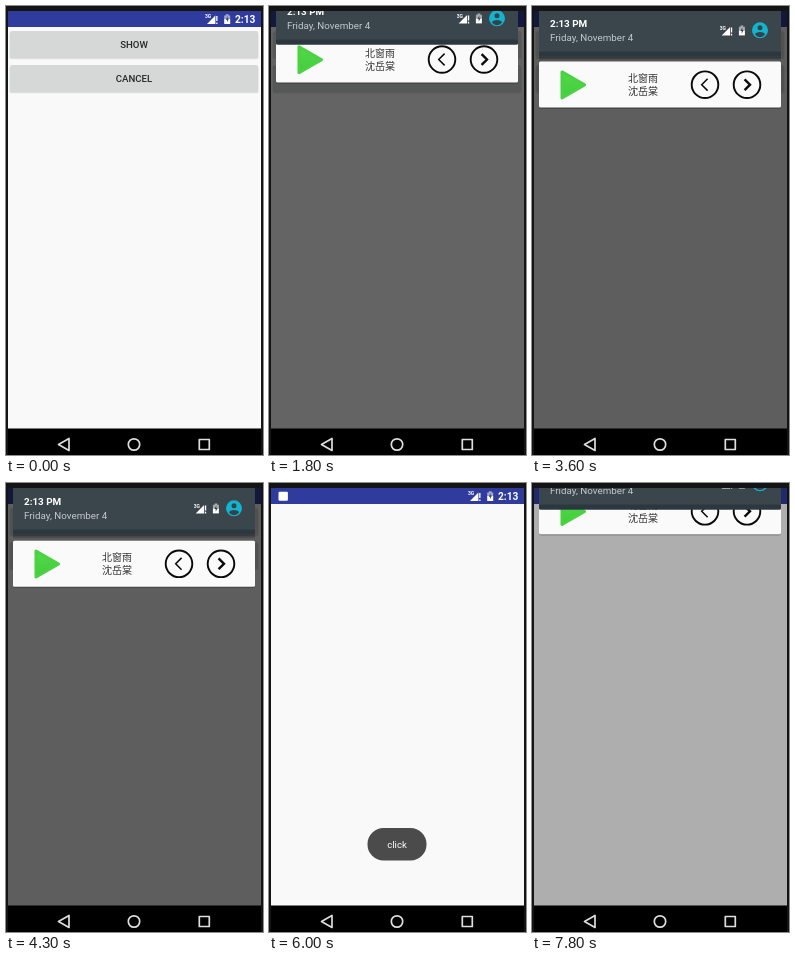
Recreate the animation shown at these times as an HTML page. Size 257 by 449 pixels, loop 8 s.

```html
<!DOCTYPE html>
<html lang="en">
<head>
<meta charset="utf-8">
<title>Notification panel</title>
<style>
html, body { margin: 0; width: 100%; height: 100%; overflow: hidden; background: #141414; }
svg { display: block; width: 257px; height: 449px; font-family: Roboto, sans-serif; }
.cjk { font-family: "Noto Sans CJK SC", "Noto Sans CJK", sans-serif; }
.ink { fill: none; stroke: #0a0a0a; }
</style>
</head>
<body>
<svg viewBox="0 0 257 449">
  <defs>
    <clipPath id="screen"><rect x="2" y="5" width="253" height="418"/></clipPath>
    <linearGradient id="strip" x2="0" y2="1">
      <stop offset="0" stop-color="#3c4aa8"/><stop offset="1" stop-color="#4c58a6"/>
    </linearGradient>
    <linearGradient id="shade" x2="0" y2="1">
      <stop offset="0" stop-opacity=".4"/><stop offset="1" stop-opacity="0"/>
    </linearGradient>
    <linearGradient id="green" x2="0" y2="1">
      <stop offset="0" stop-color="#52da4a"/><stop offset="1" stop-color="#44cb3d"/>
    </linearGradient>
    <g id="signal" fill="#fff">
      <text x="199" y="12.4" font-size="5" font-weight="700">3G</text>
      <path d="M201 18 L209.4 9.6 V18Z"/>
      <path d="M210.2 10h1.3v5h-1.3zM210.2 16.4h1.3V18h-1.3z"/>
      <path d="M219.8 8.2h2.8v1.2h1.6V13h-6V9.4h1.6z" opacity=".55"/>
      <path d="M218.2 13h6v5h-6z"/>
      <path d="M221.6 10l-1.9 3.7h1.3v2.6l1.9-3.8h-1.3z" fill="#3a444b"/>
    </g>
    <g id="button">
      <rect x="3.5" y="26" width="249" height="27.3" rx="2" opacity=".13"/>
      <rect x="4" y="25" width="248" height="27" rx="2" fill="#d6d7d7"/>
    </g>
  </defs>

  <g clip-path="url(#screen)">
    <rect x="2" y="5" width="253" height="418" fill="#f9f9f9"/>
    <g text-anchor="middle" font-size="9.6" font-weight="500" fill="#262626">
      <use href="#button"/>
      <rect id="press" x="4" y="25" width="248" height="27" rx="2" opacity=".07"/>
      <ellipse id="ripple" cx="152" cy="40" rx="32" ry="11" fill="#c6c7c7"/>
      <text x="128" y="42.3">SHOW</text>
      <use href="#button" y="34"/>
      <text x="128" y="76.3">CANCEL</text>
    </g>

    <rect id="cover" x="2" y="21" width="253" height="402" fill="#f9f9f9"/>
    <g id="window">
      <rect id="top" height="10.5" fill="url(#strip)" opacity=".93"/>
      <rect id="foot" height="20" fill="#2b2b2b"/>
    </g>

    <rect x="2" y="5" width="253" height="16" fill="#2f3c9d"/>
    <g id="icons">
      <rect id="note" x="9.5" y="8.8" width="9.4" height="9" rx="1" fill="#fff"/>
      <use href="#signal"/>
      <text x="229" y="17" font-size="10.2" font-weight="700" fill="#fff">2:13</text>
    </g>

    <g id="toast">
      <rect x="98.5" y="345" width="59" height="32.5" rx="16" fill="#4b4b4b"/>
      <text x="128" y="364.6" font-size="9.6" text-anchor="middle" fill="#fff">click</text>
    </g>

    <g id="panel">
      <rect id="scrim" x="2" y="5" width="253" height="418"/>
      <rect id="shadow" x="7" y="51.5" width="242" height="5" fill="url(#shade)"/>
      <g id="card">
        <rect x="7" y="59" width="242" height="46" rx="2" opacity=".25"/>
        <rect x="7" y="57.7" width="242" height="46" rx="1.5" fill="#fafafa"/>
        <path d="M30 68 L52.6 81 L30 94Z" fill="url(#green)" stroke="#4ad243" stroke-width="3" stroke-linejoin="round"/>
        <g class="cjk" font-size="10" fill="#333">
          <text x="96" y="78">北窗雨</text>
          <text x="96" y="91.4">沈岳棠</text>
        </g>
        <g class="ink" stroke-width="1.9">
          <circle cx="173" cy="80.8" r="13.3"/>
          <circle cx="215" cy="80.8" r="13.3"/>
          <path d="M175.6 74.9 L169.7 80.8 L175.6 86.7" stroke-width="1.5"/>
          <path d="M212.6 75.4 L218 80.8 L212.6 86.2" stroke-width="2.4"/>
        </g>
      </g>
      <g id="header">
        <rect x="7" y="-40" width="242" height="91.5" rx="1.5" fill="#3b454c"/>
        <rect x="7" y="46.5" width="242" height="5" rx="1.5" fill="#2c383f"/>
        <text x="18" y="22" font-size="9.9" font-weight="700" fill="#fff">2:13 PM</text>
        <text x="18" y="36.4" font-size="9.8" fill="#c4c9cc">Friday, November 4</text>
        <use href="#signal" x="-11.3" y="12.4"/>
        <circle cx="228" cy="25.3" r="8" fill="#12b5d0"/>
        <circle cx="228" cy="22.7" r="2.5" fill="#35424a"/>
        <path d="M223 29.6c0-3.4 10-3.4 10 0a6.2 6.2 0 0 1-10 0z" fill="#35424a"/>
      </g>
    </g>
  </g>

  <rect x="2" y="422.5" width="253" height="27" fill="#000"/>
  <g fill="none" stroke="#dedede" stroke-width="1.7" stroke-linejoin="round">
    <path d="M52.5 438.5 L63 432.5 V444.5Z"/>
    <circle cx="128" cy="438.5" r="5.7"/>
    <rect x="193.3" y="433.5" width="10" height="10"/>
  </g>
</svg>
<script>
const LOOP = 8000, STEP = 100;
const HIDDEN = 29.5; // upward pull at which the panel is off screen

// Each visit: when it opens, how far up it starts, when it is swiped away or cut.
const visits = [
  { open: 1800, lag: 13, swipe: 2100, end: 2300 },
  { open: 3600, lag: 1, bounce: 3800, end: 5400 },
  { open: 7800, lag: 25, end: LOOP }
];

const $ = id => document.getElementById(id);
const set = (id, attrs) => { for (const k in attrs) $(id).setAttribute(k, attrs[k]); };
const show = (id, on) => set(id, { display: on ? "inline" : "none" });
const within = (t, a, b) => t >= a && t < b;
const ramp = (t, a, b) => Math.min(1, Math.max(0, (t - a) / (b - a)));
const mix = (a, b, k) => a + (b - a) * k;
const shift = (id, y) => set(id, { transform: `translate(0 ${y})` });

function drawPanel(t) {
  const v = visits.find(v => within(t, v.open, v.end));
  show("panel", v);
  if (!v) return;
  let pull = v.lag * (1 - ramp(t, v.open, v.open + STEP));
  if (t >= v.swipe) pull = 12 * ((t - v.swipe) / STEP + 1);
  const drop = t >= v.bounce ? 28 * (1 - ramp(t, v.bounce, v.bounce + 500)) ** 2 : 0;
  shift("header", -pull);
  shift("shadow", -pull);
  shift("card", drop - 2.1 * pull);
  set("scrim", { opacity: .62 * (1 - (pull / HIDDEN) ** 4) });
}

function drawOpening(t) {
  const k = ramp(t, 5400, 5700);
  set("cover", { opacity: t < 5400 ? 0 : mix(.86, 1, k) });
  show("window", within(t, 5400, 5700));
  const x = mix(4, 2, k), width = mix(248, 253, k);
  set("top", { x, width, y: mix(27.5, 5, k) });
  set("foot", { x, width, y: mix(285, 422, k) });
}

function draw(t) {
  show("press", within(t, 600, 700));
  set("ripple", { opacity: t < 600 ? 0 : 1 - ramp(t, 600, 900) });
  show("note", t >= 700);
  const away = within(t, 1800, 2700) ? ramp(t, 2400, 2700) : 1;
  set("icons", { opacity: within(t, 5400, 6000) ? 0 : away });
  set("toast", { opacity: ramp(t, 5500, 5800) - ramp(t, 6800, 7200) });
  drawOpening(t);
  drawPanel(t);
}

function tick() {
  const t = performance.now() % LOOP;
  draw(t - t % STEP);
  requestAnimationFrame(tick);
}
tick();
</script>
</body>
</html>
```
